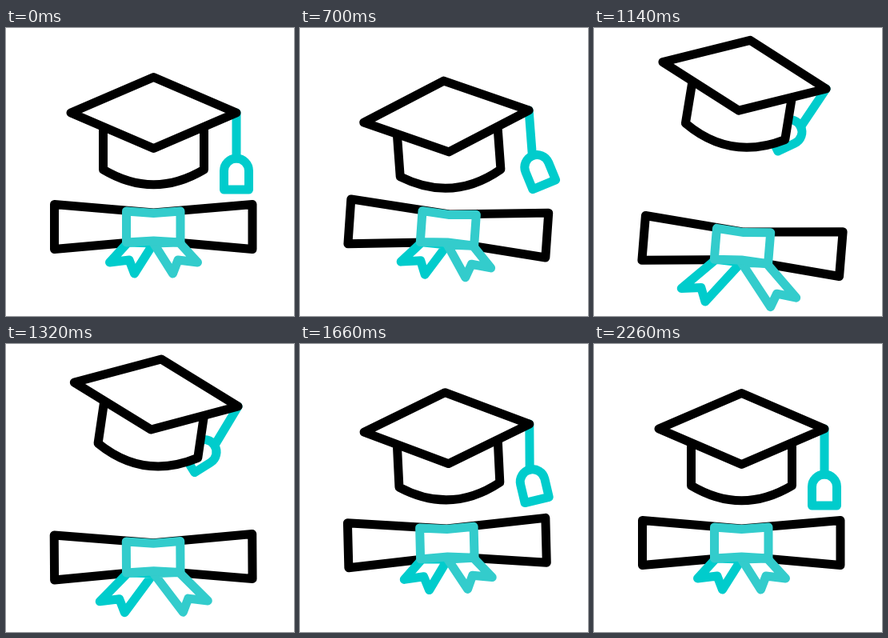
An HTML page for the animation above (2.4 s loop, 360 by 360 pixels).

```html
<!DOCTYPE html>
<html lang="en">
<head>
<meta charset="utf-8">
<title>Graduation cap and diploma</title>
<style>
  html, body { margin: 0; width: 100%; height: 100%; overflow: hidden; background: #fff; }
  svg { display: block; width: 100vw; height: 100vh; }
  path { stroke-width: 11; stroke-linejoin: round; stroke-linecap: round; fill: #fff; stroke: #000; }
  .bright { stroke: #00cccc; }
  .soft { stroke: #33cccc; }
  #tassel path { fill: none; }
</style>
</head>
<body>
<svg viewBox="0 0 360 360">
  <g id="diploma">
    <path d="M60.5 220.5L184.5 231L308 220.5V276.5L184.5 265.5L60.5 276.5Z"/>
    <path class="bright" id="left"/>
    <path class="soft" id="right"/>
    <path class="soft" d="M150.5 229L184.5 231.5L218 229V268L184.5 266L150.5 268Z"/>
  </g>
  <g id="cap">
    <g id="tassel">
      <path class="bright" d="M288 106V163"/>
      <g id="tag"><path class="bright" d="M272.5 202V178.5a15.5 15.5 0 0 1 31 0V202Z"/></g>
    </g>
    <path d="M121.5 125V177Q184.5 214.5 247.5 177V125"/>
    <path d="M81 106L184.5 61.5L288 106L184.5 150.5Z"/>
  </g>
</svg>
<script>
const LOOP = 2400;
const $ = id => document.getElementById(id);

// Smooth step from 0 to 1 between two times.
function ease(t, from, to) {
  const u = Math.min(1, Math.max(0, (t - from) / (to - from)));
  return (1 - Math.cos(Math.PI * u)) / 2;
}

// Rises from 0 to 1 at the peak, then falls back.
const bump = (t, start, peak, end) => ease(t, start, peak) - ease(t, peak, end);

function place(id, angle, x, y, dy = 0) {
  $(id).setAttribute("transform", `translate(0 ${dy}) rotate(${angle} ${x} ${y})`);
}

// One ribbon end; stretch pulls its forked tip away from the knot.
function drawTail(id, side, stretch) {
  const dx = 17 * stretch, dy = 14.5 * stretch;
  const point = (x, y) => `${184.5 + side * x} ${y}`;
  const fork = [[55, 293], [30.5, 290], [24, 307]].map(([x, y]) => point(x + dx, y + dy));
  $(id).setAttribute("d", `M${point(32, 268)}L${fork.join("L")}L${point(0, 269)}Z`);
}

function draw() {
  const t = performance.now() % LOOP;

  // The cap crouches, leaps, lands in a crouch and settles.
  const leap = bump(t, 640, 1200, 1800);
  const crouch = ease(t, 220, 580) - leap - ease(t, 1800, 2260);
  const blend = (low, high) => low * crouch + high * leap;
  const capTurn = blend(-4.6, 9.7), string = blend(-5.5, 35), tag = blend(-25, 67);
  place("cap", capTurn, 184.5, 128, blend(6, -48.5));
  place("tassel", string - capTurn, 288, 106);
  place("tag", tag - string, 288, 163);

  // The diploma drops and rocks with fading swings.
  const drop = bump(t, 600, 1150, 1650);
  const rock = 7 * bump(t, 380, 970, 1500) - 2.9 * bump(t, 970, 1500, 1900) + 1.2 * bump(t, 1500, 1900, 2260);
  place("diploma", rock, 184.5, 264, 24 * drop);
  drawTail("left", -1, drop);
  drawTail("right", 1, drop);

  requestAnimationFrame(draw);
}
draw();
</script>
</body>
</html>
```
